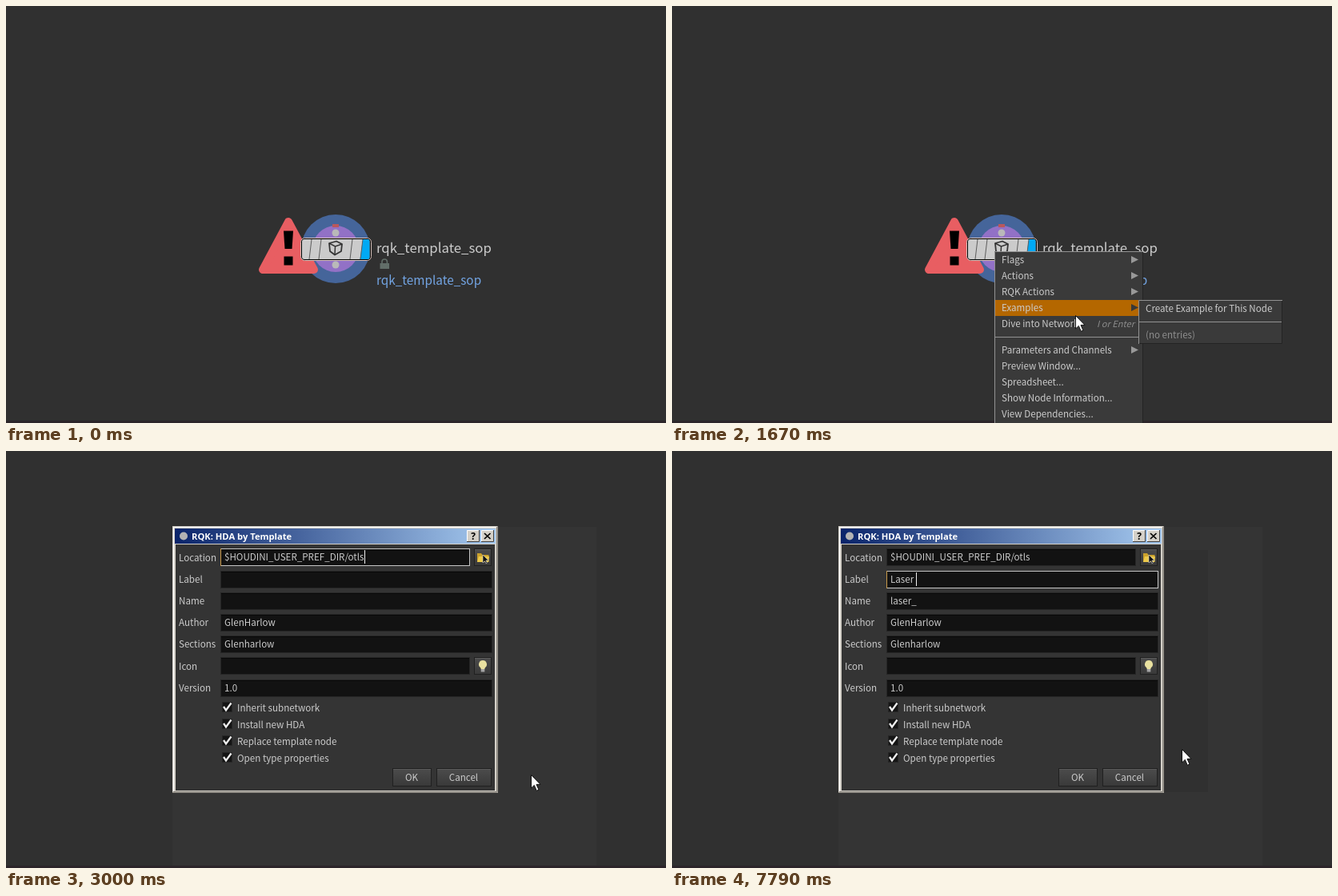
These frames come from a looping animation (825 by 522 pixels, 8000 ms). An HTML page:

```html
<!DOCTYPE html>
<html lang="en">
<head>
<meta charset="utf-8">
<title>Create asset by template</title>
<style>
html, body { margin: 0; width: 100%; height: 100%; overflow: hidden; background: #303030; }
svg { display: block; width: 825px; height: 522px; }
text { font: 11.6px "Noto Sans CJK JP", "Noto Sans CJK SC", "Noto Sans CJK", "Open Sans", sans-serif; fill: #ccc; white-space: pre; }
.title { font: 700 11.2px "Noto Sans", "Open Sans", sans-serif; fill: #fff; }
.key { font-size: 11.1px; font-style: italic; fill: #8c8c8c; text-anchor: end; }
.mid { text-anchor: middle; }
.off { fill: #8e8e8e; }
</style>
</head>
<body>
<svg id="stage" viewBox="0 0 825 522">
  <defs>
    <linearGradient id="bar"><stop offset="0" stop-color="#0a246a"/><stop offset="1" stop-color="#a6caf0"/></linearGradient>
    <linearGradient id="btn" x2="0" y2="1"><stop offset="0" stop-color="#4c4c4c"/><stop offset="1" stop-color="#393939"/></linearGradient>
  </defs>
</svg>
<script>
const svg = document.getElementById('stage');
const LOOP = 8000;

const rect = (x, y, w, h, fill, more = '') =>
  `<rect x="${x}" y="${y}" width="${w}" height="${h}" fill="${fill}" ${more}/>`;
const path = (d, fill, more = '') => `<path d="${d}" fill="${fill}" ${more}/>`;
const line = (d, color, w = 1) => path(d, 'none', `stroke="${color}" stroke-width="${w}"`);
const label = (x, mid, s, more = '') => `<text x="${x}" y="${mid + 4.5}" ${more}>${s}</text>`;

function layer(html) {
  const g = document.createElementNS('http://www.w3.org/2000/svg', 'g');
  g.innerHTML = html;
  svg.append(g);
  return g;
}
const show = (el, on) => el.setAttribute('display', on ? 'inline' : 'none');

// Last row whose start time has passed
const at = (rows, t) => rows.reduce((hit, row) => (row[0] <= t ? row : hit), rows[0]);

// Backdrop and node
const shadeA = layer(rect(208, 95, 530, 427, '#343434'));
const shadeB = layer(rect(448, 124, 222, 303, '#303030'));
layer(rect(0, 519, 825, 3, '#2c252a'));

layer(
  '<circle cx="412" cy="304" r="43" fill="#45659a"/><circle cx="412" cy="304" r="29" fill="#9271c6"/>' +
  rect(408, 273, 8, 4, '#b9585c') +
  '<circle cx="412" cy="284" r="4.5" fill="#b9b9b9"/><circle cx="412" cy="324" r="4.5" fill="#b9b9b9"/>' +
  path('M353 270L321 330H385Z', '#e85e62', 'stroke="#e85e62" stroke-width="10" stroke-linejoin="round"') +
  path('M347 281.500H359L357.500 304H348.500Z', '#000') + rect(347.5, 313.5, 11, 11, '#000') +
  `<text x="463" y="309" style="font-size:16.8px">rqk_template_sop</text>` +
  `<text x="463" y="348.5" style="font-size:15.3px;fill:#73a5e4">rqk_template_sop</text>` +
  rect(467.5, 322, 11.5, 7, '#626e69') + line('M470 322V320a3.200 3 0 0 1 6.400 0V322', '#626e69', 1.6)
);
layer(rect(368.5, 290.5, 88, 28, '#000', 'rx="5" stroke="#d9c3bd"'));
const body = layer(rect(370, 292, 84.5, 25, '#cbcbcb', 'rx="3"'));
layer(
  path('M446 292H452a2.500 2.500 0 0 1 2.500 2.500V314.500a2.500 2.500 0 0 1 -2.500 2.500H442.500Z', '#00a9f4') +
  [382, 394, 433, 446].map(x => line(`M${x} 292L${x - 3} 317`, '#5c5c5c')).join('') +
  path('M404 297L413 294.500L420 298L419 307L411 311.500L405 307Z', 'none',
    'stroke="#343434" stroke-width="1.800" stroke-linejoin="round"') +
  line('M404 297L411.500 301L420 298M411.500 301L411 311', '#343434', 1.5)
);

// Menus
const arrow = (mid, color) => path(`M574 ${mid - 4.5}L583 ${mid}L574 ${mid + 4.5}Z`, color);
const rowBar = (x, w, mid) => rect(x, mid - 9.5, w, 20, '#b46700');

function panel(x, y, w, h) {
  return rect(x, y, w, h, '#3a3a3a') + line(`M${x + w - .5} ${y}V${y + h - .5}H${x}`, '#232323') +
    line(`M${x + .5} ${y + h}V${y + .5}H${x + w}`, '#929292');
}
const rule = (x, y, w) => line(`M${x} ${y + .5}h${w}`, '#929292');

const mainRows = [
  [317, 'Flags', 1], [337, 'Actions', 1], [357, 'RQK Actions', 1], [377, 'Examples', 1],
  [397, 'Dive into Network'], [430, 'Parameters and Channels', 1], [450, 'Preview Window...'],
  [470, 'Spreadsheet...'], [490, 'Show Node Information...'], [510, 'View Dependencies...']
];
const menu = layer(panel(403, 307, 186, 230) + rule(404, 414, 184));
const menuBars = mainRows.map(([mid, , sub]) =>
  layer(rowBar(404, 184, mid + .5) + (sub ? arrow(mid + .5, '#383838') : '')));
const menuText = layer(
  mainRows.map(([mid, s]) => label(412, mid, s)).join('') + label(578, 397, 'I or Enter', 'class="key"'));
const menuArrows = mainRows.map(([mid, , sub]) => layer(sub ? arrow(mid + .5, '#999') : ''));

const exampleMenu = layer(panel(583, 368, 180, 55) + rule(584, 395, 178) +
  label(592, 378, 'Create Example for This Node') + label(592, 411, '(no entries)', 'class="off"'));

const toolRows = [
  [358, 'Generate Code...'], [378, 'Show Node User Data...'], [411, 'Make HDA by Template...'],
  [431, 'Open HDA Location...'], [451, 'New HDA Version...']
];
const toolMenu = layer(panel(583, 348, 155, 115) + rule(584, 395, 153));
const toolBars = toolRows.map(([mid]) => layer(rowBar(584, 153, mid + .5)));
const toolText = layer(toolRows.map(([mid, s]) => label(592, mid, s)).join(''));

// Dialog
const frame = layer(line('M208.500 428V94.500H615', '#d4d0c8') + line('M614.500 95V428.500H209', '#6a6a6a') +
  line('M211 116.500H612', '#d4d0c8'));

const button = (x, y, w, h) => rect(x + .5, y + .5, w - 1, h - 1, 'url(#btn)', 'stroke="#202020"') +
  line(`M${x + 1} ${y + 1.5}h${w - 2}`, '#5a5a5a');

const fields = [
  [133, 'Location', '$HOUDINI_USER_PREF_DIR/otls', 312], [160.5, 'Label', ''], [187.5, 'Name', ''],
  [214.5, 'Author', 'GlenHarlow'], [241.5, 'Sections', 'Glenharlow'], [269, 'Icon', '', 312],
  [296.5, 'Version', '1.0']
];
const checks = ['Inherit subnetwork', 'Install new HDA', 'Replace template node', 'Open type properties'];

const dialog = layer(
  rect(208, 94, 407, 334, '#d4d0c8') + line('M209.500 426V95.500H613', '#fff') +
  line('M613.500 95V426.500H209', '#86827c') + line('M614.500 94V427.500H208', '#9c9890') +
  rect(212, 117, 399, 308, '#343434') +
  fields.map(([mid, name, value, w = 340]) => {
    const top = Math.round(mid - 11);
    return label(216, mid, name) + rect(268.5, top + .5, w - 1, 21, '#121212', 'stroke="#262626"') +
      line(`M269 ${top + 1.5}h${w - 2}`, '#080808') + label(273, mid - .5, value);
  }).join('') +
  checks.map((s, i) => {
    const mid = 321 + 21 * i;
    return rect(270.5, mid - 6.5, 12, 12, '#141414', 'stroke="#262626"') +
      line(`M272 ${mid - 1}l3 4.500l6.500 -9`, '#eee', 2.3) + label(289, mid, s);
  }).join('') +
  button(483, 397, 49, 23) + label(507, 408.5, 'OK', 'class="mid"') +
  button(538, 397, 69, 23) + label(572, 408.5, 'Cancel', 'class="mid"') +
  button(585, 122, 22, 22) + button(585, 258, 22, 22) +
  path('M589 128h5l1.500 2h8v9h-14.500Z', '#caa12c') + path('M589 139l2 -7h13l-1 7Z', '#ecc94b') +
  path('M596 130v10l2.500 -2.200l1.500 3l1.500 -.8l-1.500 -3h3.200Z', '#111', 'stroke="#ddd" stroke-width=".6"') +
  path('M596 262a5 5 0 0 1 3 9l-.8 2h-4.400l-.8 -2a5 5 0 0 1 3 -9Z', '#e9e1a0') +
  rect(593.7, 273, 4.6, 3.5, '#a5a5a5')
);

const capButton = x => rect(x, 99, 16, 15, '#d4d0c8') + line(`M${x + .5} 113V99.500h15`, '#fff') +
  line(`M${x + 15.5} 99V113.500h-15.500`, '#404040');
const title = layer(
  rect(211, 97, 401, 19, 'url(#bar)') + '<circle cx="222" cy="106.500" r="5" fill="#b4b4b4"/>' +
  '<text class="title" x="232" y="111">RQK: HDA by Template</text>' +
  capButton(576) + capButton(594) +
  '<text class="title mid" x="584" y="111" style="fill:#000;font-size:12px">?</text>' +
  line('M598 103l7.500 7M605.500 103l-7.500 7', '#000', 1.7)
);

const focusBox = (y, w) => rect(268.5, y + .5, w - 1, 21, 'none', 'stroke="#c6c6c6"') +
  line(`M268.500 ${y}v22`, '#c8994a');
const focusA = layer(focusBox(122, 312));
const focusB = layer(focusBox(150, 340));
const caret = layer(rect(0, 0, 1, 17, '#f0f0f0'));
const typed = layer(label(273, 160, '') + label(273, 187, ''));
const [typedLabel, typedName] = typed.children;

const pointer = layer(path('M.5 .5V17L4.300 13.400L7.300 20.300L10 19.100L7 12.400H12Z', '#fff',
  'stroke="#111" stroke-linejoin="round"'));

// Step tables: time first
const moves = [
  [0, -50, -50], [430, 441, 397], [520, 432, 372], [610, 422, 345], [710, 412, 318], [800, 407, 305],
  [1410, 420, 319], [1500, 446, 338], [1590, 476, 363], [1670, 504, 387], [1740, 511, 391],
  [1830, 515, 388], [1920, 518, 381], [2010, 519, 373], [2100, 520, 363], [2180, 521, 357],
  [2360, 560, 361], [2450, 602, 369], [2550, 636, 387], [2640, 656, 405],
  [3440, 650, 396], [3530, 640, 383], [3620, 631, 373], [3890, 637, 373]
];
const mainPick = [[0, -1], [1410, 0], [1500, 1], [1590, 3], [2100, 2]];
const toolPick = [[0, -1], [2450, 1], [2640, 2]];
const subs = [[0, ''], [1590, 'example'], [2100, 'tool'], [3000, '']];
const carets = [
  [0, 0], [3000, 448, 124], [3530, 0], [4050, 448, 124], [4330, 0], [4860, 273, 152], [5470, 0],
  [6070, 273, 152], [6600, 279, 152], [6840, 286, 152], [7150, 291, 152], [7330, 298, 152],
  [7500, 302, 152], [7790, 305, 152]
];
const typing = [[0, 0], [6600, 1], [6840, 2], [7150, 3], [7330, 4], [7500, 5], [7790, 6]];

function draw(t) {
  const menuOn = t >= 1050 && t < 3000;
  const open = t >= 3000;
  const main = at(mainPick, t)[1];
  const tool = at(toolPick, t)[1];
  const sub = at(subs, t)[1];

  show(shadeA, open);
  show(shadeB, t >= 3440);
  body.firstChild.setAttribute('fill', t >= 1050 && t < 1410 ? '#b0b0b0' : '#cbcbcb');

  [menu, menuText].forEach(el => show(el, menuOn));
  menuBars.forEach((el, i) => show(el, menuOn && i === main));
  menuArrows.forEach((el, i) => show(el, menuOn && i !== main));
  show(exampleMenu, sub === 'example');
  [toolMenu, toolText].forEach(el => show(el, sub === 'tool'));
  toolBars.forEach((el, i) => show(el, sub === 'tool' && i === tool));

  show(frame, t >= 2910 && !open);
  show(title, t >= 2910);
  show(dialog, open);
  show(focusA, open && t < 4330);
  show(focusB, t >= 4860);

  const [, cx, cy] = at(carets, t);
  show(caret, cx > 0);
  if (cx) caret.setAttribute('transform', `translate(${cx} ${cy})`);

  const text = 'Laser '.slice(0, at(typing, t)[1]);
  typedLabel.textContent = text;
  typedName.textContent = text.toLowerCase().replace(' ', '_');

  const [, px, py] = at(moves, t);
  pointer.setAttribute('transform', `translate(${px} ${py})`);
}

const start = performance.now();
function tick() {
  draw((performance.now() - start) % LOOP);
  requestAnimationFrame(tick);
}
tick();
</script>
</body>
</html>
```
